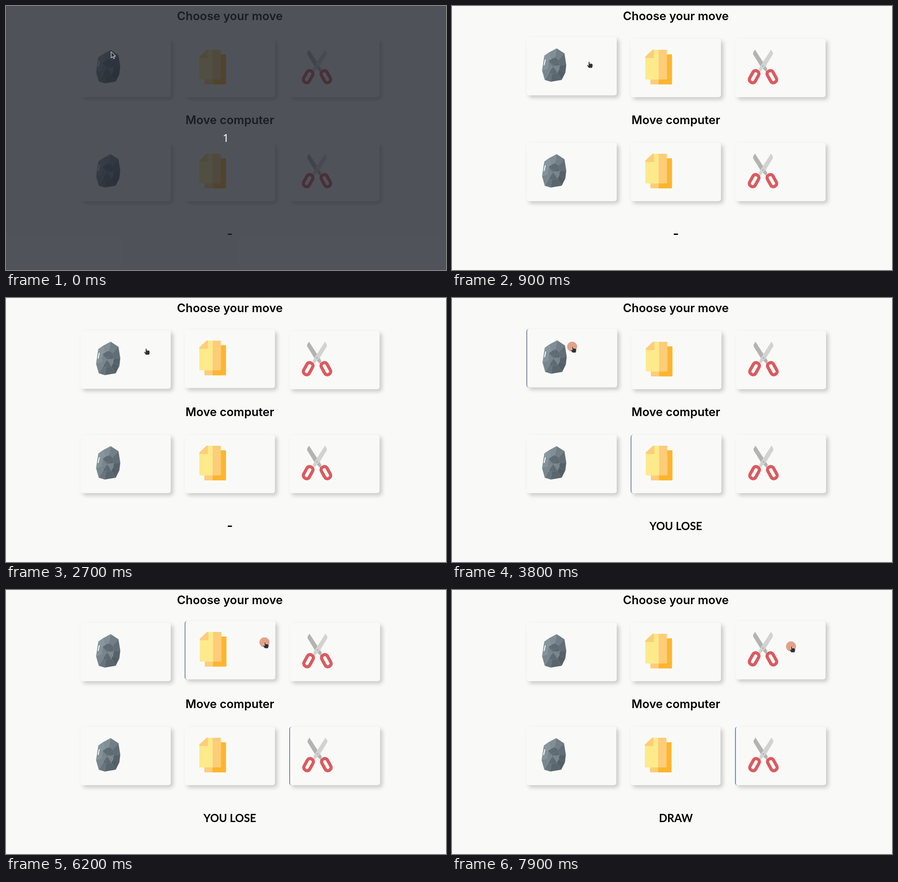
Recreate the animation shown at these times as an HTML page. Size 967 by 579 pixels, loop 8 s.

```html
<!DOCTYPE html>
<html lang="en">
<head>
<meta charset="utf-8">
<title>Rock paper scissors</title>
<style>
  html, body { margin: 0; width: 100%; height: 100%; overflow: hidden; background: #f9faf8; }
  #stage { position: relative; width: 967px; height: 579px; overflow: hidden; }
  #stage > svg { position: absolute; inset: 0; }
  .card {
    position: absolute; width: 198px; height: 128px; border: 0 solid;
    border-radius: 5px; background: #f9faf8; box-shadow: 5px 5px 10px rgba(0, 0, 0, .2);
  }
  .card svg { position: absolute; left: 0; top: 0; overflow: visible; }
  text { text-anchor: middle; }
  .title { font: 600 25.7px Poppins, Inter, sans-serif; }
  .result { font: 700 24px Poppins, Lato, sans-serif; }
  .dash { font: 600 28px Inter, sans-serif; }
  .count { font: 24px "Noto Sans", sans-serif; fill: #fff; }
</style>
</head>
<body>
<div id="stage">
  <div id="cards"></div>
  <svg width="967" height="579">
    <text class="title" x="492" y="31">Choose your move</text>
    <text class="title" x="492" y="259">Move computer</text>
    <text id="result" x="492" y="509"></text>
    <g id="overlay">
      <rect width="967" height="579" fill="#20242d" fill-opacity=".78"/>
      <text class="count" x="483" y="298">1</text>
    </g>
    <g id="ripple"><circle id="ring"/><circle id="dot" r="11"/></g>
    <g id="cursor" stroke-linejoin="round">
      <path id="arrow" d="M0 0V14L3.3 11L5.5 15.5L7.8 14.4L5.7 10H10Z" fill="#333" stroke="#fff"/>
      <path id="hand" d="M0 1Q1.4-1 2.8 1V4.5Q8 3 9.2 6.5V10L8 14H.6L-3.4 8.3Q-3 6-1.6 7.2L0 8.6Z"
        fill="#303030" stroke="#f4f4f4" stroke-width=".8"/>
    </g>
  </svg>
</div>
<script>
const LOOP = 8000, STEP = 100, FADE = 500, LIFT = 4, BORDER = 2;
const WIDTH = 198, HEIGHT = 128, ROWS = [72, 300];
const LEFT = [0, 1, 2].map(i => Math.round(164 + 229.25 * i));

const $ = id => document.getElementById(id);
const mix = (a, b, p) => a + (b - a) * p;
const ramp = (t, from, to) => Math.min(1, Math.max(0, (t - from) / (to - from)));
const blend = (a, b, p) => `rgb(${a.map((v, i) => mix(v, b[i], p))})`;

// CSS "ease" timing, solved by bisection.
function ease(x) {
  const bezier = (a, b, s) => 3 * a * s * (1 - s) ** 2 + 3 * b * s * s * (1 - s) + s ** 3;
  let lo = 0, hi = 1;
  for (let i = 0; i < 16; i++) {
    const mid = (lo + hi) / 2;
    if (bezier(.25, .25, mid) < x) lo = mid; else hi = mid;
  }
  return bezier(.1, 1, lo);
}

const poly = (fill, points) => `<polygon points="${points}" fill="${fill}" stroke="${fill}" stroke-width=".3"/>`;
const rect = (fill, x, y, w, h) => `<rect x="${x}" y="${y}" width="${w}" height="${h}" rx="1" fill="${fill}"/>`;

// Facets run from the rim to a core and are lit from the left.
function rock() {
  const rim = [[230, 97], [247, 108], [251, 133], [249, 150], [241, 166],
    [217, 170], [204, 166], [198, 145], [203, 113], [213, 106]];
  const heart = [222, 136];
  const toHeart = (p, k) => p.map((v, i) => mix(v, heart[i], k));
  const tone = p => blend([76, 88, 96], [142, 156, 164], p);
  const facets = rim.map((a, i) => {
    const b = rim[(i + 1) % rim.length];
    const [inA, inB] = [toHeart(a, .5), toHeart(b, .5)];
    const light = .5 - .4 * Math.cos((i - 2.8) * Math.PI / 5);
    return poly(tone(light), [a, b, inB, inA]) + poly(tone(i % 4 < 2 ? .25 : .65), [inA, inB, heart]);
  });
  return facets.join('') +
    '<path d="M205 122L202.5 133" stroke="#fff" stroke-width="2" stroke-linecap="round"/>';
}

function paper() {
  const [pale, tan, amber] = ['#fdea8b', '#fdcd7a', '#feb52e'];
  return rect(tan, 436, 106, 40, 66) + rect(amber, 454, 106, 29.5, 66) +
    poly(pale, '425,111 441,96 455,96 455,161 425,161') +
    rect(tan, 454, 96, 18.5, 65) + poly(tan, '425,111 441,96 443.5,96 443.5,114 425,114');
}

function scissors() {
  const half = fill => poly(fill, '666,96 662,102 662,106 678,132 690,144 693,138 686,127') +
    `<rect x="-7" y="-14" width="14" height="28" rx="6.5" fill="none" stroke="#dc5a5f" stroke-width="7"
      transform="translate(664 155) rotate(29)"/>`;
  return half('#b3b4b2') + `<g transform="translate(1367) scale(-1 1)">${half('#d2d3d1')}</g>` +
    '<circle cx="683.5" cy="131.5" r="1.8" fill="#aeb0ae"/>';
}

const ICONS = [rock(), paper(), scissors()];

// Pointer moves: start, end, x, y.
const MOVES = [
  [100, 900, 300, 122], [950, 1300, 480, 130], [1600, 1800, 677, 139], [1950, 2350, 480, 130],
  [2450, 2950, 264, 106], [4500, 4800, 568, 114], [6750, 6900, 717, 122], [7000, 7400, 745, 123]
];

const cursorAt = t => MOVES.reduce(([x, y], [start, end, toX, toY]) => {
  const p = ease(ramp(t, start, end));
  return [mix(x, toX, p), mix(y, toY, p)];
}, [231, 100]);

const cardAt = t => LEFT.findIndex(left => Math.abs(cursorAt(t)[0] - left - WIDTH / 2) < WIDTH / 2);

// Moments when the pointer enters or leaves a card.
const hovers = [];
for (let t = -50, last = -1; t < LOOP; t += 10) {
  const card = cardAt(t);
  if (card !== last) hovers.push({ at: t, card });
  last = card;
}

function lift(card, t) {
  let height = 0, from = 0, goal = 0, since = -FADE;
  const heightAt = time => mix(from, goal, ease(ramp(time, since, since + FADE)));
  for (const hover of hovers) {
    if (hover.at > t) break;
    const next = hover.card === card ? LIFT : 0;
    if (next === goal) continue;
    height = heightAt(hover.at);
    [from, goal, since] = [height, next, hover.at];
  }
  return heightAt(t);
}

const ROUNDS = [
  { press: 3600, hit: 3690, reply: 1 },
  { press: 6000, hit: 6090, reply: 2 },
  { press: 7700, hit: 7900, reply: 2 }
];
const latest = (key, t) => ROUNDS.filter(round => round[key] <= t).pop();

const rows = ROWS.map(top => ICONS.map((icon, i) => {
  const card = document.createElement('div');
  card.className = 'card';
  card.style.top = top + 'px';
  card.innerHTML = `<svg width="${WIDTH}" height="${HEIGHT}">
    <g transform="translate(${-LEFT[i]} ${-ROWS[0]})">${icon}</g></svg>`;
  $('cards').append(card);
  return card;
}));

// The chosen card grows a border and the centred row spreads with it.
function drawRow(cards, chosen, since, t) {
  const grown = ease(ramp(t, since, since + FADE));
  const border = grown > 0 ? Math.max(1, Math.floor(grown * BORDER + .01)) : 0;
  cards.forEach((card, i) => {
    card.style.left = LEFT[i] + (i > chosen ? border : -border) / 2 + 'px';
    card.style.borderLeftWidth = (i === chosen ? border : 0) + 'px';
    card.style.borderLeftColor = blend([0, 0, 0], [74, 144, 240], grown);
  });
}

function drawRipple(t) {
  const click = latest('press', t);
  $('ripple').style.display = click ? '' : 'none';
  if (!click) return;
  const age = t - click.press;
  const [x, y] = cursorAt(click.press);
  const spread = ramp(age, 400, 900), shrink = ramp(age, 900, 1500);
  $('ripple').setAttribute('transform', `translate(${x} ${y + .8})`);
  $('dot').setAttribute('fill', blend([229, 161, 135], [170, 149, 139], spread));
  $('dot').setAttribute('opacity', 1 - ramp(age, 900, 1150));
  $('ring').setAttribute('r', mix(mix(11, 22, spread), 14, shrink));
  $('ring').setAttribute('fill', blend([205, 197, 191], [225, 232, 227], shrink));
  $('ring').setAttribute('opacity', age < 400 ? 0 : 1 - ramp(age, 1200, 1500));
}

function draw(t) {
  const round = latest('hit', t);
  const pick = round ? cardAt(round.press) : -1;
  const reply = round ? round.reply : -1;
  const replied = ROUNDS.find(r => r.reply === reply);
  drawRow(rows[0], pick, round ? round.hit : LOOP, t);
  drawRow(rows[1], reply, replied ? replied.hit : LOOP, t);
  rows[0].forEach((card, i) => card.style.transform = `translateY(${-lift(i, t)}px)`);

  const outcome = ['DRAW', 'YOU LOSE', 'YOU WIN'][(reply - pick + 3) % 3];
  $('result').textContent = round ? outcome : '-';
  $('result').setAttribute('class', round ? 'result' : 'dash');
  $('overlay').style.display = t < 100 ? '' : 'none';

  drawRipple(t);
  $('cursor').setAttribute('transform', `translate(${cursorAt(t)})`);
  $('arrow').style.display = t < 200 ? '' : 'none';
  $('hand').style.display = t < 200 ? 'none' : '';
}

const begin = performance.now();
function tick() {
  const t = (performance.now() - begin) % LOOP;
  draw(Math.floor(t / STEP) * STEP);
  requestAnimationFrame(tick);
}
tick();
</script>
</body>
</html>
```
